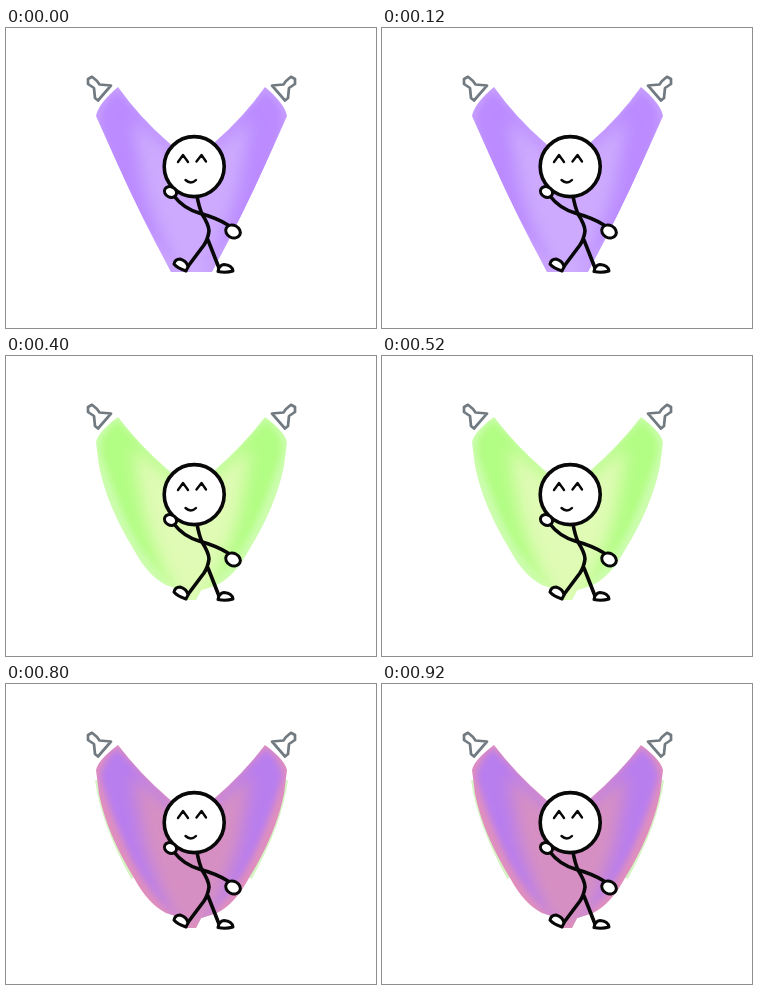
An HTML page that plays this animation: 370 px wide and 300 px high, repeating every 1 s.

```html
<!DOCTYPE html>
<html lang="en">
<head>
<meta charset="utf-8">
<title>Dancing under spotlights</title>
<style>
html, body { margin: 0; width: 100%; height: 100%; overflow: hidden; background: #fff; }
svg { display: block; width: 370px; height: 300px; }
.ink { fill: none; stroke: #080808; stroke-width: 3.6; stroke-linecap: round; stroke-linejoin: round; }
.ink .skin { fill: #fff; stroke-width: 3; }
.ink .face { stroke-width: 2.4; }
.lamp { fill: #fff; stroke: #707a80; stroke-width: 2.7; stroke-linejoin: round; }
</style>
</head>
<body>
<svg viewBox="0 0 370 300">
  <defs>
    <filter id="soft" filterUnits="userSpaceOnUse" x="0" y="0" width="370" height="300"><feGaussianBlur stdDeviation=".6"/></filter>
    <filter id="wash" filterUnits="userSpaceOnUse" x="0" y="0" width="370" height="300"><feGaussianBlur stdDeviation="3"/></filter>
    <filter id="haze" filterUnits="userSpaceOnUse" x="0" y="0" width="370" height="300"><feGaussianBlur stdDeviation="8"/></filter>
    <clipPath id="inside"><path id="clipL"/><path id="clipR" transform="matrix(-1 0 0 1 371 0)"/></clipPath>
    <path id="lamp" d="M82 56 L82 51 L86 48.8 L91 53 L93.5 56.5 L105 57.5 L92 72.5 L89 70 L88 60 Z"/>
    <path id="half"/>
    <path id="core" d="M111 64 L162 116 L190 148 V236 H172 Q144 211 126 176 Q104 130 94 92 Q96 77 111 64 Z"/>
    <path id="center" d="M126 90 L160 118 L190 138 V250 H174 Q152 206 138 160 Z"/>
    <path id="fringe" d="M91 96 Q97 140 127 194"/>
  </defs>

  <g id="rim" filter="url(#soft)" fill="none" stroke="#d6f3c4" stroke-width="4">
    <use href="#fringe"/><use href="#fringe" transform="matrix(-1 0 0 1 371 0)"/>
  </g>
  <g id="edge" filter="url(#soft)">
    <use href="#half"/><use href="#half" transform="matrix(-1 0 0 1 371 0)"/>
  </g>
  <g clip-path="url(#inside)">
    <g id="main" filter="url(#wash)">
      <use href="#core"/><use href="#core" transform="matrix(-1 0 0 1 371 0)"/>
    </g>
    <g id="glow" filter="url(#haze)">
      <use href="#center"/><use href="#center" transform="matrix(-1 0 0 1 371 0)"/>
    </g>
  </g>

  <use href="#lamp" class="lamp"/>
  <use href="#lamp" class="lamp" transform="matrix(-1 0 0 1 371 0)"/>

  <g class="ink">
    <g id="limbs">
      <path d="M191 168 Q193 179 196 186 Q203 197 203 203 Q202 211 198 217 L180 241 M202 212 L213 240"/>
      <path d="M168 168 Q177 180 193 185 Q211 190 222 197"/>
    </g>
    <circle id="head" cx="188.2" r="30" fill="#fff"/>
    <g class="face">
      <path d="M172 134 L177 127 L182 134 M190.5 133.5 L195.5 127 L200 133.5"/>
      <path id="mouth"/>
    </g>
    <g id="ends">
      <ellipse class="skin" cx="164.5" cy="164" rx="6.3" ry="5.2" transform="rotate(25 164.5 164)"/>
      <ellipse class="skin" cx="227" cy="203.5" rx="7.6" ry="6.2" transform="rotate(28 227 203.5)"/>
      <path class="skin" d="M180 243 Q171 240 168 236 Q169 231 174 231 Q181 233 182 239 Z"/>
      <path class="skin" d="M212 243.5 Q213 237 218 236.5 Q226 237 227 243 Q220 245 212 243.5 Z"/>
    </g>
  </g>
</svg>
<script>
const $ = id => document.getElementById(id);
const STEP = 200;

// outer side of the left beam, from the floor up to the lamp
const sides = {
  straight: 'H165 Q134 186 112 137 L90 88',
  wide: 'H157 Q118 176 103 120 L89.5 88',
  round: 'H181 L176 234 L160 229 Q142 220 128 194 Q101 150 93 110 L90 86'
};

const looks = [
  { side: 'straight', top: 59, edge: '#c69eff', main: '#bb8bff', glow: '#d3b5fd', haze: .75 },
  { side: 'wide', top: 66, edge: '#ff9d9b', main: '#fd7576', glow: '#ffb0ae', haze: .85 },
  { side: 'round', top: 61, edge: '#ccfdae', main: '#b2fd84', glow: '#e2fbb8', haze: .95 },
  { side: 'wide', top: 59, edge: '#e58fb4', main: '#b77cf0', glow: '#da8fc0', haze: .85, rim: true },
  { side: 'round', top: 61, edge: '#e08fbd', main: '#b97eee', glow: '#d992be', haze: .9, rim: true }
];

const beam = ({ side, top }) =>
  `M112 ${top} Q134 90 162 114 L190 141 V244 ${sides[side]} Q92 76 112 ${top} Z`;

function draw(ms) {
  const step = Math.floor(ms / STEP) % looks.length;
  const look = looks[step];
  const flipped = step % 2 === 1;
  const outline = beam(look);
  for (const id of ['half', 'clipL', 'clipR']) $(id).setAttribute('d', outline);
  for (const id of ['edge', 'main', 'glow']) $(id).setAttribute('fill', look[id]);
  $('glow').setAttribute('opacity', look.haze);
  $('rim').setAttribute('visibility', look.rim ? 'visible' : 'hidden');

  const pose = flipped ? 'matrix(-1 0 0 1 381 0)' : '';
  $('limbs').setAttribute('transform', pose);
  $('ends').setAttribute('transform', pose);
  $('head').setAttribute('cy', flipped ? 138 : 138.6);
  $('mouth').setAttribute('d', flipped ? 'M175 149 Q185 158 194 149' : 'M179.5 152 Q185 157 190 152');
}

const start = performance.now();
function tick() {
  draw(performance.now() - start);
  requestAnimationFrame(tick);
}
tick();
</script>
</body>
</html>
```
